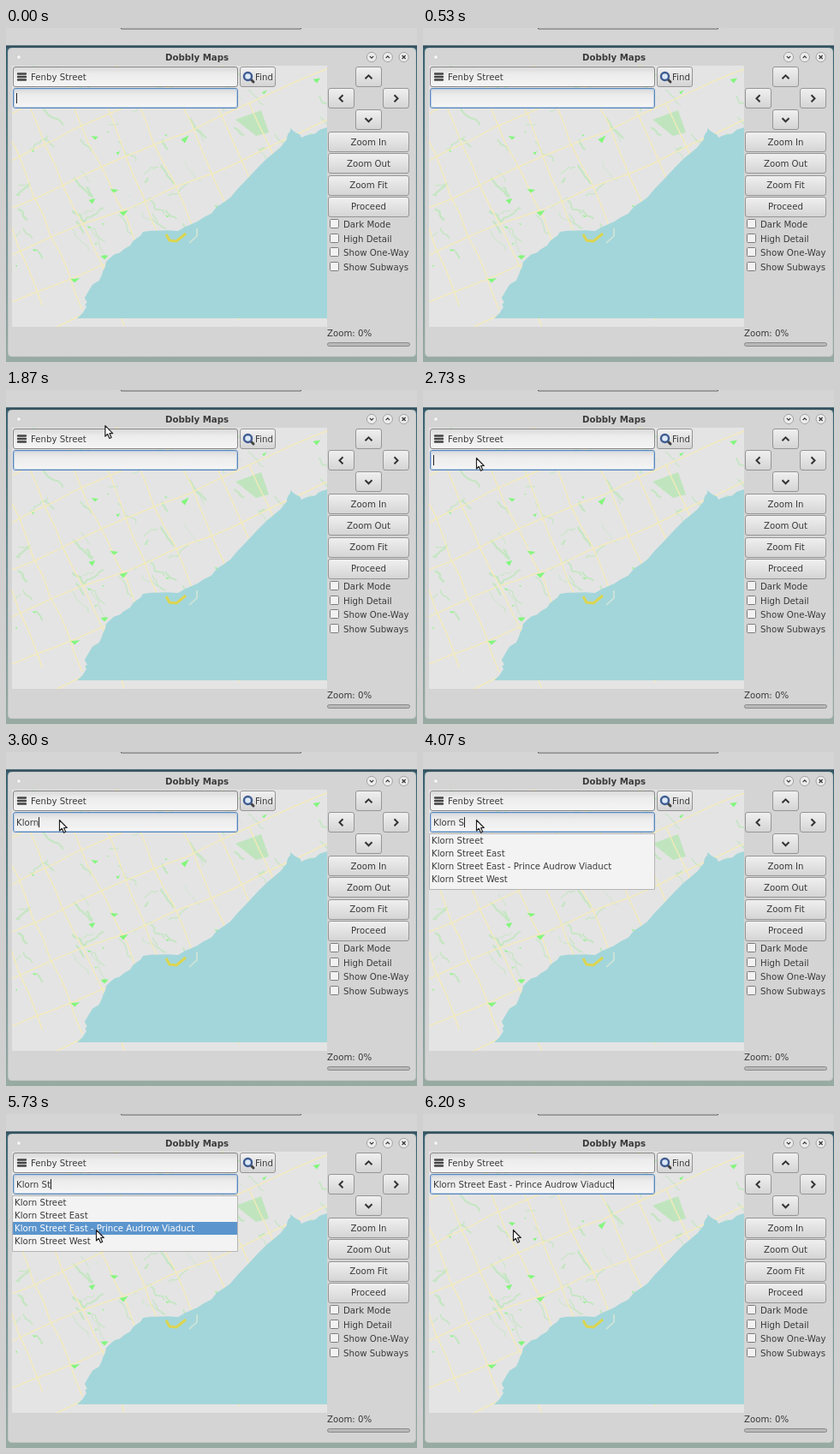
Animation of 480x390 px, one loop 6.27 s. Source, as an HTML page:

```html
<!DOCTYPE html>
<html lang="en">
<head>
<meta charset="utf-8">
<title>Dobbly Maps</title>
<style>
html, body { margin: 0; width: 100%; height: 100%; overflow: hidden; background: #d4d4d4; }
svg { display: block; width: 480px; height: 390px; }
text { font: 10.2px "DejaVu Sans", sans-serif; fill: #3a3a3a; white-space: pre; }
.title { font-weight: bold; }
.mid { text-anchor: middle; }
.line { fill: none; stroke: #333; }
</style>
</head>
<body>
<svg viewBox="0 0 480 390">
  <defs>
    <linearGradient id="desk" x2="0" y2="1">
      <stop stop-color="#315a6b"/><stop offset=".5" stop-color="#668b91"/><stop offset="1" stop-color="#98aba3"/>
    </linearGradient>
    <linearGradient id="button" x2="0" y2="1">
      <stop stop-color="#f0f0f0"/><stop offset="1" stop-color="#d4d4d4"/>
    </linearGradient>
    <linearGradient id="field" x2="0" y2="1">
      <stop stop-color="#d9d9d9"/><stop offset=".35" stop-color="#ececec"/><stop offset="1" stop-color="#f5f5f5"/>
    </linearGradient>
    <clipPath id="mapClip"><path d="M7 44H375V349H7Z"/></clipPath>
  </defs>

  <path fill="url(#desk)" d="M0 0H480V390H0Z"/>
  <path fill="#d5d5d5" d="M0 0H480V20.500H0Z"/>
  <path fill="#f4f4f4" stroke="#555" d="M134.500-2V1H344.500V-2"/>
  <path fill="#34525f" d="M0 20.500H480V23H0Z"/>
  <rect x="2.500" y="23.500" width="476" height="360" rx="4" fill="#d4d4d4" stroke="#c2c6c5"/>

  <g clip-path="url(#mapClip)">
    <path fill="#e4e4e4" d="M7 44H375V349H7Z"/>
    <g id="valleys" class="line" style="stroke:#c5e6c3" stroke-linejoin="round"></g>
    <path fill="#c0e5be" d="M268 107L298 96 307 122 292 126Z"/>
    <g id="roads" class="line" style="stroke:#f5ebb8" stroke-width="1.300"></g>
    <g id="parks" fill="#83f67d"></g>
    <path id="lake" fill="#a3d6da"/>
    <path class="line" style="stroke:#dcd551" stroke-width="3" d="M187 241L191 248 199 249 210 240"/>
    <path class="line" style="stroke:#d4e5d8" stroke-width="1.600" d="M214 251L223 243V234"/>
  </g>

  <text class="title mid" x="223" y="38">Dobbly Maps</text>
  <circle cx="15" cy="34" r="2.500" fill="#f4f4f4" stroke="#c5c5c5" stroke-width=".7"/>
  <g id="controls"></g>

  <path stroke="#444" stroke-width="2.400" stroke-linecap="round" d="M14 53.500H23M14 57H23M14 60.500H23"/>
  <path stroke="#444" stroke-width="3" stroke-linecap="round" d="M286 60L289 63"/>
  <circle cx="282.500" cy="56.500" r="4.500" fill="#dce9f6" stroke="#3f5c92" stroke-width="2.400"/>

  <text x="29" y="60.500">Fenby Street</text>
  <text x="291" y="60.500">Find</text>
  <text id="typed" x="12" y="86"></text>
  <path id="caret" stroke="#222" d="M.5 76V88"/>
  <text x="375" y="359.500">Zoom: 0%</text>
  <rect x="375.500" y="367.500" width="96" height="4" rx="2" fill="#b9b9b9" stroke="#8a8a8a"/>

  <g id="menu">
    <path fill="#f3f3f3" stroke="#b5b5b5" d="M7.500 95.500H270.500V160.500H7.500Z"/>
    <path id="row" fill="#5c95cd" d="M8 96H270V111H8Z"/>
  </g>
  <path id="pointer" fill="#fff" stroke="#222" stroke-width="1.200" stroke-linejoin="round" d="M.5 .5V13L3.300 10.300 5.500 15.300 7.700 14.300 5.600 9.500H9.300Z"/>
</svg>
<script>
const LOOP = 6270;
const $ = id => document.getElementById(id);

function add(id, tag, attrs, label = '') {
  const el = document.createElementNS('http://www.w3.org/2000/svg', tag);
  for (const name in attrs) el.setAttribute(name, attrs[name]);
  el.textContent = label;
  return $(id).appendChild(el);
}

let seed = 37;
const random = () => (seed = seed * 16807 % 2147483647) / 2147483647;
const jitter = size => (random() - .5) * size;

// Map: wandering valleys, a skewed street grid, parks and a ragged shore
function wander(x, y, dx, dy, steps, rough) {
  let d = `M${x} ${y}`;
  for (let i = 0; i < steps; i++) d += `L${x += dx + jitter(rough)} ${y += dy + jitter(rough)}`;
  return d;
}

for (let i = 0; i < 75; i++) {
  const steep = random() < .65;
  const d = wander(9 + random() * 360, 46 + random() * 220, 2.5, steep ? 3 : -1.5, 3 + random() * 5, 5);
  add('valleys', 'path', { d, 'stroke-width': .6 + random() * 2 });
}
for (let i = 0; i < 6; i++) {
  add('roads', 'path', { d: wander(7, 100 + i * 55, 26, -11, 15, 5) });
}
for (let i = 0; i < 9; i++) {
  add('roads', 'path', { d: wander(i * 43 - 60, 70 + i % 3 * 9, 10, 23, 11, 5) });
}

function park(x, y, size) {
  const d = wander(x - size, y, size, jitter(size), 2, 2) + `L${x} ${y + size}Z`;
  add('parks', 'path', { d });
}
[[363, 60], [104, 126], [209, 130], [101, 201], [126, 188], [137, 215], [115, 266], [80, 293]]
  .forEach(([x, y]) => park(x, y, 4.5));
for (let i = 0; i < 22; i++) park(9 + random() * 350, 50 + random() * 240, 1 + random() * 2);

const shore = [[375, 116], [345, 128], [332, 117], [328, 130], [295, 162], [262, 198], [231, 221],
  [201, 237], [160, 238], [145, 254], [120, 270], [112, 288], [93, 313], [94, 326], [83, 339]];
const ragged = shore.slice(1).map(([x, y], i) => {
  const [px, py] = shore[i];
  const bays = [.25, .5, .75].map(k => `${px + (x - px) * k + jitter(3)} ${py + (y - py) * k + jitter(3)}`);
  return `L${bays.join(' ')} ${x} ${y}`;
});
$('lake').setAttribute('d', `M${shore[0]}${ragged.join('')}H375Z`);

// Window controls
function box(x, y, w, h, fill = 'url(#button)', stroke = '#959595', rx = 2.5) {
  add('controls', 'rect', { x: x + .5, y: y + .5, width: w, height: h, rx, fill, stroke });
}
function chevron(x, y, angle, size, width) {
  const d = `M${-size} ${size / 2}L0 ${-size / 2} ${size} ${size / 2}`;
  add('controls', 'path', { d, class: 'line', 'stroke-width': width, transform: `translate(${x} ${y}) rotate(${angle})` });
}

for (let i = 0; i < 3; i++) {
  const x = 427 + i * 18.8;
  add('controls', 'circle', { cx: x, cy: 34, r: 5.6, fill: '#ececec', stroke: '#a2a2a2' });
  if (i < 2) chevron(x, 34, 180 - i * 180, 2.2, 1.2);
  else add('controls', 'path', { d: `M${x - 2} 32l4 4m0-4l-4 4`, class: 'line', 'stroke-width': 1.2 });
}
box(8, 45, 262, 23, 'url(#field)', '#858585');
box(8, 70, 262, 23, 'url(#field)', '#5785b9');
box(9, 71, 260, 21, 'none', '#b4cbe5');
box(273, 45, 41, 23);
for (let i = 0; i < 4; i++) {
  const turn = i * Math.PI / 2;
  const x = 423.5 + 32 * Math.sin(turn), y = 82.3 - 25 * Math.cos(turn);
  box(Math.round(x - 15.5), Math.round(y - 12), 30, 23);
  chevron(x, y, i * 90, 4, 2);
}
['Zoom In', 'Zoom Out', 'Zoom Fit', 'Proceed'].forEach((label, i) => {
  const y = 121 + i * 25.3;
  box(376, Math.round(y), 94, 23);
  add('controls', 'text', { x: 423.5, y: y + 15.5, class: 'mid' }, label);
});
['Dark Mode', 'High Detail', 'Show One-Way', 'Show Subways'].forEach((label, i) => {
  const y = 223 + i * 16.7;
  box(378, Math.round(y), 10, 10, '#f2f2f2', '#7c7c7c', 1);
  add('controls', 'text', { x: 394, y: y + 10 }, label);
});

const street = 'Klorn Street';
const viaduct = street + ' East - Prince Audrow Viaduct';
const rows = [street, street + ' East', viaduct, street + ' West'].map((label, i) =>
  add('menu', 'text', { x: 10, y: 107 + i * 15 }, label));

const enter = 1800, menuOpen = 4070, picked = 5860;
const clamp = (v, low, high) => Math.min(high, Math.max(low, v));
const progress = (t, from, to) => clamp((t - from) / (to - from), 0, 1);
const easeOut = k => 1 - (1 - k) ** 1.5;

function pointerAt(t) {
  const arrive = easeOut(progress(t, enter, 2000));
  const descend = progress(t, 4860, 5700);
  return [165 - 103 * arrive + 43 * descend, 6 + 73 * arrive + 56 * easeOut(descend)];
}

// The first word is typed quickly, the rest with pauses
const lettersAt = t => t < 3420
  ? clamp(Math.floor((t - 2725) / 135), 0, 5)
  : clamp(5 + Math.floor((t - 3420) / 280), 5, 8);

const show = (el, on) => el.setAttribute('visibility', on ? 'visible' : 'hidden');

function draw() {
  const t = performance.now() % LOOP;
  const typed = $('typed');
  typed.textContent = t < picked ? street.slice(0, lettersAt(t)) : viaduct;
  const caretX = 12 + (typed.textContent && typed.getComputedTextLength());
  $('caret').setAttribute('transform', `translate(${Math.round(caretX)})`);
  show($('caret'), t >= 2800 || t % 1200 < 400 || t % 1200 >= 800);

  // The highlight trails slightly behind the pointer
  const chosen = Math.floor((pointerAt(t - 130)[1] - 96) / 15);
  const open = t >= menuOpen && t < picked;
  $('menu').style.display = open ? '' : 'none';
  show($('row'), open && chosen >= 0);
  $('row').setAttribute('transform', `translate(0 ${chosen * 15})`);
  rows.forEach((row, i) => row.style.fill = i === chosen ? '#fff' : '');

  show($('pointer'), t >= enter);
  $('pointer').setAttribute('transform', `translate(${pointerAt(t)})`);
  requestAnimationFrame(draw);
}
draw();
</script>
</body>
</html>
```
